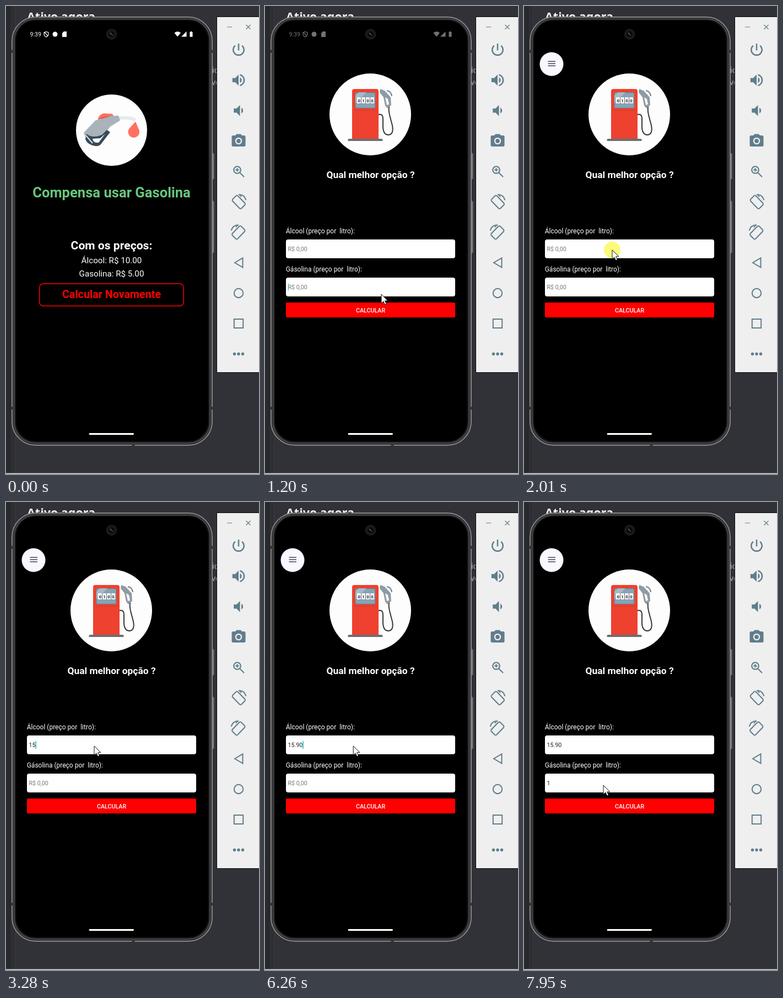
An HTML page for the animation above (8000 ms loop, 459 by 846 pixels).

```html
<!DOCTYPE html>
<html lang="pt">
<head>
<meta charset="utf-8">
<style>
  html, body { margin: 0; width: 100%; height: 100%; overflow: hidden; background: #313237; }
  svg { display: block; }
  text { font-family: Roboto, sans-serif; }
  .bold { font-weight: 700; }
  .mid { text-anchor: middle; }
  .line { fill: none; stroke: #607d8b; stroke-width: 2; }
  .field { font-size: 10.7px; }
</style>
</head>
<body>
<svg width="459" height="846" viewBox="0 0 459 846">
  <defs>
    <linearGradient id="strip">
      <stop offset="0" stop-color="#292a2e"/>
      <stop offset=".5" stop-color="#27282c"/>
      <stop offset=".6" stop-color="#303136"/>
      <stop offset="1" stop-color="#2d2e32"/>
    </linearGradient>
    <g id="rotate" class="line">
      <path d="M-11-4.5L-4.5-11Q-3-12-1.5-11L11.5 2.5Q12.500 4 11.500 5.500L5 12Q3.500 13 2 12L-11-1.500Q-12-3-11-4.500Z"/>
      <path d="M0-13Q10-14 13.500-3M1-14l4 5"/>
    </g>
  </defs>

  <!-- desktop -->
  <rect width="459" height="846" fill="#313237"/>
  <rect width="16" height="846" fill="url(#strip)"/>
  <path d="M16.500 0V845" stroke="#3b3b3e"/>
  <rect y="844.500" width="459" height="1.500" fill="#d8d8d8"/>
  <text x="38" y="27" fill="#f2f3f5" class="bold" style="font: 700 21.5px 'Noto Sans', sans-serif">Ativo agora</text>
  <g fill="#a9abb0" font-size="15">
    <text x="374" y="121">ic</text>
    <text x="373" y="143">vo</text>
  </g>

  <!-- phone -->
  <g fill="#77777a" stroke="#333">
    <rect x="372" y="265.500" width="6" height="48" rx="2"/>
    <rect x="372" y="352" width="6" height="95" rx="2"/>
  </g>
  <rect x="11" y="20" width="363" height="774" rx="43" fill="#29292b" stroke="#858587" stroke-width="2"/>
  <rect x="14.500" y="23.500" width="356" height="767" rx="39" fill="none" stroke="#4c4c4e" stroke-width="1.500"/>
  <rect x="18" y="26" width="349" height="761" rx="36" stroke="#0b0b0b" stroke-width="2"/>
  <path d="M10 82h4M10 727h4M371 82h4M371 727h4M154 20v3M231 791v4" stroke="#333" stroke-width="5"/>
  <circle cx="191.500" cy="51" r="10" fill="#191919"/>
  <circle cx="191.500" cy="51" r="5" fill="#080808"/>
  <path d="M189 49l2 1" stroke="#888" stroke-width="1.500"/>
  <path d="M191 51l3 2" stroke="#99474d" stroke-width="1.500"/>
  <rect x="150.500" y="772" width="81.500" height="3.200" rx="1.600" fill="#fff"/>

  <g id="status" fill="#fff">
    <text x="43.500" y="54.500" font-size="10.600">9:39</text>
    <path d="M73 46.500l4 1.500v3q0 3-4 5-4-2-4-5v-3ZM70 48l6 6" fill="none" stroke="#fff" stroke-width="1.200"/>
    <circle cx="89" cy="51" r="4.500"/>
    <path d="M105 46h5v10h-8v-7Z"/>
    <path d="M305.500 48.500Q311.500 44 317 48.500L311.200 55.500ZM327.500 46v9.500H318ZM333.500 47h1.500v-1.200h2V47h1.500v8.800h-5Z"/>
  </g>

  <g id="result">
    <circle cx="191.500" cy="224.500" r="64.500" fill="#fdfdfd"/>
    <path d="M166 211q0-14 11-17l16 1 5 9-26 9Z" fill="#ff705f"/>
    <path d="M172 203l14-3" stroke="#c94f45" stroke-width="2"/>
    <path d="M199 204Q219 199 235 206" fill="none" stroke="#e8e9eb" stroke-width="6"/>
    <path d="M141 229l21-22 28-8 14-1 3 9-18 11-14 18q-4 4-9-1l-20 8Z" fill="#aab2ba"/>
    <path d="M146 231q10 9 28 2l9-9 6 4-17 22q-4 4-10 3-14-2-18-12Z" fill="#354b5a"/>
    <path d="M157 240l14-1 9-8-12 16q-10 1-11-7Z" fill="#fdfdfd"/>
    <path d="M145 234l12 14" stroke="#dce1e5" stroke-width="2"/>
    <path d="M235 209Q239 219 241.500 224 244 233 236 237 228 240 223 233 220 228 223 222Z" fill="#ff705f"/>
    <g class="mid" fill="#fff">
      <text x="191.500" y="346" font-size="25.600" class="bold" fill="#66c77d">Compensa usar Gasolina</text>
      <text x="191.500" y="439.500" font-size="21.100" class="bold">Com os preços:</text>
      <text x="191.500" y="465" font-size="15.200">Álcool: R$ 10.00</text>
      <text x="191.500" y="489" font-size="15.200">Gasolina: R$ 5.00</text>
      <rect x="60.700" y="502" width="261.500" height="40.300" rx="7" fill="none" stroke="#f00" stroke-width="1.500"/>
      <text x="191.500" y="528" font-size="19.700" class="bold" fill="#f00">Calcular Novamente</text>
    </g>
  </g>

  <g id="form">
    <circle cx="191" cy="196" r="74" fill="#fdfdfd"/>
    <path d="M206 196h3q5 0 5 8v16q1 13 10 13 10-1 7-17l-5-19q-3-12 1-24" fill="none" stroke="#35383c" stroke-width="2"/>
    <path d="M209 150l8 3 11 12 1 14-7 6-4-5-3-15-7-9Z" fill="#8e9ba3"/>
    <path d="M218 165l5 3 2 10-4 1Z" fill="#fdfdfd"/>
    <path d="M221 153q8 1 9 10" fill="none" stroke="#777f86" stroke-width="2"/>
    <path d="M158 242v-88q0-4 4-4h40q4 0 4 4v88Z" fill="#ee412f"/>
    <path d="M158 188h48" stroke="#d63929"/>
    <rect x="164" y="156.500" width="36" height="28" rx="2" fill="#86a3b5" stroke="#5f7e91"/>
    <path d="M164 162l6-6h14l-20 20Z" fill="#a3bac8"/>
    <rect x="167" y="165" width="31" height="11" fill="#fff"/>
    <path d="M174.500 165v11M182.500 165v11M190.500 165v11" stroke="#55616b"/>
    <g class="mid bold" font-size="8" fill="#222">
      <text x="170.700" y="173.500">0</text><text x="178.500" y="173.500">1</text>
      <text x="186.500" y="173.500">0</text><text x="194.300" y="173.500">0</text>
    </g>
    <path d="M150.500 244v-2q0-2 2-2h59q2 0 2 2v2Z" fill="#6a6e73"/>
    <g fill="#fff">
      <text x="191.500" y="310.500" font-size="17.400" class="bold mid">Qual melhor opção ?</text>
      <text x="37.700" y="411" font-size="12">Álcool (preço por&nbsp; litro):</text>
      <text x="37.700" y="480" font-size="12">Gásolina (preço por&nbsp; litro):</text>
      <rect x="38" y="422" width="307" height="34" rx="4"/>
      <rect x="38" y="491" width="307" height="34" rx="4"/>
      <rect x="38" y="536" width="307" height="27" rx="2" fill="#f00"/>
      <text x="191.500" y="553.500" font-size="10.700" font-weight="500" class="mid">CALCULAR</text>
    </g>
    <text id="alcohol" class="field" x="41.500" y="443.300"></text>
    <text id="gas" class="field" x="41.500" y="512.300"></text>
    <rect id="caret" width="1.500" height="14" fill="#14c5bd"/>
    <g id="menu">
      <circle cx="50" cy="105" r="21.500" fill="#f9f7ff"/>
      <path d="M43.500 100.200H57M43.500 104.200H57M43.500 108.200H57" stroke="#222027" stroke-width="1.300"/>
    </g>
  </g>

  <!-- emulator toolbar -->
  <rect x="382.500" y="19.500" width="78" height="643" fill="#efefef" stroke="#0c0c0d"/>
  <path class="line" style="stroke-width:1.200" d="M401 38h9M435.500 34l8 8M443.500 34l-8 8"/>
  <g id="tools" fill="#607d8b"></g>
  <g transform="translate(422 299)">
    <path class="line" d="M-2.500-9a6.300 6.300 0 1 0 .01 0ZM2 2l8 8M-5.700-2.700h6.400M-2.500-5.900v6.400"/>
  </g>
  <use href="#rotate" x="422" y="354"/>
  <use href="#rotate" transform="translate(422 409) scale(-1 1)"/>
  <path class="line" d="M429.500 455.500v17l-14.500-8.500ZM413.800 566h16.400v16h-16.400Z"/>
  <circle class="line" cx="422" cy="519" r="8.200"/>
  <path d="M414.500 629h.01M422 629h.01M429.500 629h.01" stroke="#607d8b" stroke-width="5.400" stroke-linecap="round"/>

  <circle id="press" r="15" fill="#fbfb6c" opacity=".92"/>
  <path id="pointer" d="M0 0V16.500L3.900 12.900 6.600 19 9.300 17.800 6.700 11.900H11.800Z" fill="#fff" stroke="#111"/>
</svg>
<script>
const LOOP = 8000;
const el = id => document.getElementById(id);
const show = (id, on) => el(id).style.display = on ? '' : 'none';
const ramp = (t, from, to) => Math.min(1, Math.max(0, (t - from) / (to - from)));

// [y, scale, path on a 24-unit grid]
const tools = [
  [79, 1.22, 'M13 3h-2v10h2zM17.8 5.200L16.400 6.600A7 7 0 1 1 7.600 6.600L6.200 5.200A9 9 0 1 0 17.800 5.200Z'],
  [134, 1.25, 'M3 9v6h4l5 5V4L7 9ZM16.500 12A4.500 4.500 0 0 0 14 8v8A4.500 4.500 0 0 0 16.500 12ZM14 3.200v2.100a7 7 0 0 1 0 13.400v2.100a9 9 0 0 0 0-17.600Z'],
  [189, 1.25, 'M5 9v6h4l5 5V4L9 9ZM18.500 12A4.500 4.500 0 0 0 16 8v8A4.500 4.500 0 0 0 18.500 12Z'],
  [244, 1.25, 'M9 2L7.200 4H4a2 2 0 0 0-2 2v12a2 2 0 0 0 2 2h16a2 2 0 0 0 2-2V6a2 2 0 0 0-2-2h-3.200L15 2ZM12 17a5 5 0 1 1 0-10 5 5 0 0 1 0 10ZM12 8.800a3.200 3.200 0 1 0 .01 0Z']
];
el('tools').innerHTML = tools.map(([y, scale, d]) =>
  `<path transform="translate(422 ${y}) scale(${scale}) translate(-12 -12)" d="${d}"/>`).join('');

// [time, x, y]
const moves = [
  [180, 190, 794], [800, 209, 501], [1060, 209, 501], [1200, 211, 521], [1400, 205, 537],
  [1600, 200, 525], [1870, 168, 458], [2000, 160, 441], [6260, 160, 441], [6460, 206, 424],
  [6800, 144, 512], [LOOP, 144, 512]
];
const presses = [[1060, 1130], [1940, 2150], [6810, 6950]];

// [time, alcohol, gas, focused field while the caret is lit]
const typing = [
  [0, '', '', ''], [1200, '', '', 'gas'], [1730, '', '', ''],
  [2150, '', '', 'alcohol'], [2680, '', '', ''],
  [3010, '1', '', 'alcohol'], [3280, '15', '', 'alcohol'], [3810, '15', '', ''],
  [4270, '15', '', 'alcohol'], [4820, '15', '', ''], [5280, '15', '', 'alcohol'],
  [5540, '15.', '', 'alcohol'], [5870, '15.9', '', 'alcohol'], [6000, '15.90', '', 'alcohol'],
  [6880, '15.90', '', 'gas'], [7420, '15.90', '1', 'gas'], [7950, '15.90', '1', '']
];

function pointerAt(time) {
  const t = Math.floor((time + 10) * 15 / 1000) * 1000 / 15;
  const next = Math.max(1, moves.findIndex(move => move[0] > t));
  const [t0, x0, y0] = moves[next - 1], [t1, x1, y1] = moves[next];
  const k = ramp(t, t0, t1), ease = k * k * (3 - 2 * k);
  return [x0 + (x1 - x0) * ease, y0 + (y1 - y0) * ease];
}

function setField(id, value) {
  const field = el(id);
  field.textContent = value || 'R$ 0,00';
  field.setAttribute('fill', value ? '#222' : '#777');
}

function draw(t) {
  const onForm = t >= 1130;
  show('result', !onForm);
  show('form', onForm);
  el('status').style.opacity = 1 - .55 * ramp(t, 1130, 1200) - .45 * ramp(t, 1270, 1400);
  el('menu').style.opacity = ramp(t, 1270, 1400);

  const [, alcohol, gas, focus] = typing.findLast(step => step[0] <= t);
  setField('alcohol', alcohol);
  setField('gas', gas);
  show('caret', focus);
  if (focus) {
    const typed = focus === 'gas' ? gas : alcohol;
    el('caret').setAttribute('x', 41.5 + (typed ? el(focus).getComputedTextLength() : 0));
    el('caret').setAttribute('y', focus === 'gas' ? 501 : 432);
    el('caret').setAttribute('opacity', t < 1800 ? .5 : 1);
  }

  const place = `translate(${pointerAt(t)})`;
  el('pointer').setAttribute('transform', place);
  el('press').setAttribute('transform', place);
  show('pointer', t >= 180);
  show('press', presses.some(([from, to]) => t >= from && t < to));
}

function tick() {
  draw(performance.now() % LOOP);
  requestAnimationFrame(tick);
}
tick();
</script>
</body>
</html>
```
